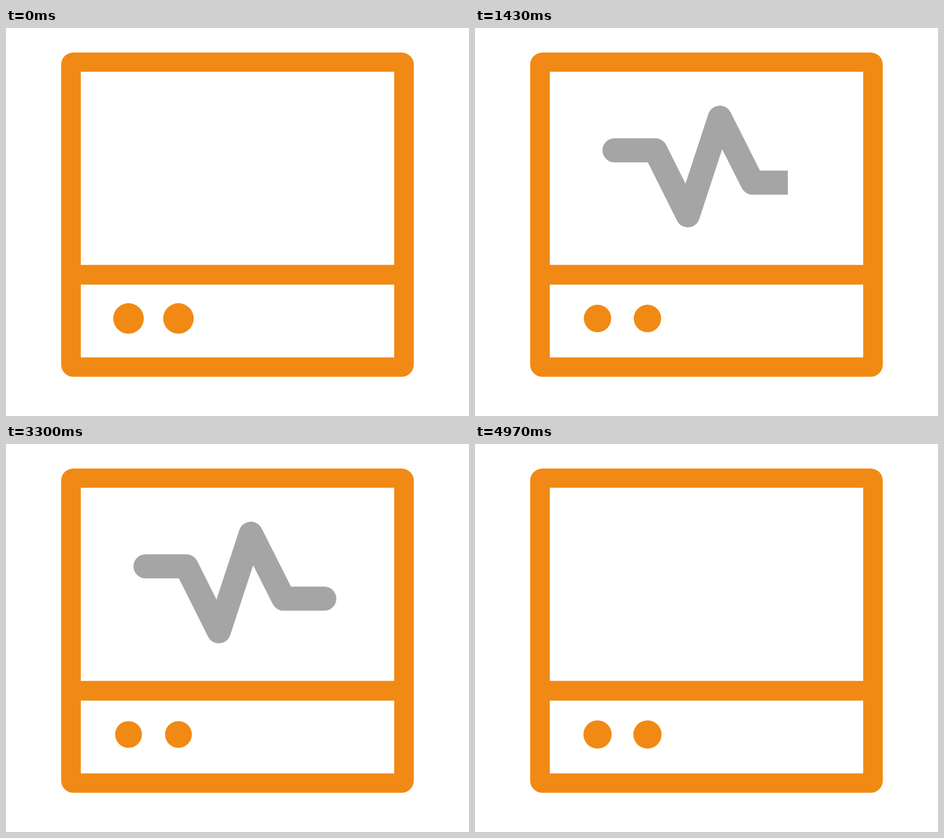
These frames come from a looping animation (817x685 px, 5010 ms). An HTML page:

```html
<!DOCTYPE html>
<html lang="en">
<head>
<meta charset="utf-8">
<title>Monitor</title>
<style>
  html, body { margin: 0; width: 100%; height: 100%; overflow: hidden; background: #fff; }
  svg { display: block; width: 817px; height: 685px; }
</style>
</head>
<body>
<svg viewBox="0 0 817 685">
  <defs>
    <clipPath id="wipe"><rect id="reveal" x="200" y="120" width="0" height="250"/></clipPath>
  </defs>
  <g fill="#f08a14">
    <rect x="97.3" y="43.3" width="622.3" height="572.5" rx="21.5"/>
    <path fill="#fff" d="M132 77.3H685V418.3H132ZM132 453H685V581.5H132Z"/>
    <circle class="dot" cx="216.2" cy="512.8"/>
    <circle class="dot" cx="304.3" cy="512.8"/>
  </g>
  <g clip-path="url(#wipe)">
    <polyline id="wave" points="246.2,216 318.3,216 375.5,330.6 432,158.4 489.7,273 561.6,273"
      fill="none" stroke="#a5a5a5" stroke-width="42.6" stroke-linecap="round" stroke-linejoin="round"/>
  </g>
</svg>
<script>
const LOOP = 5010, STEP = 100 / 3;
const WIPE = { from: 225, to: 583, time: 1870, power: 1.675, hideAt: 4000 };
const BEAT = { start: 150, fall: 600, rise: 300, small: 23.2, large: 30.7 };

const reveal = document.getElementById("reveal");
const wave = document.getElementById("wave");
const dots = document.querySelectorAll(".dot");

const mix = (a, b, u) => a + (b - a) * u;
const easeOut = (u, power) => 1 - (1 - u) ** power;
const smooth = u => u * u * (3 - 2 * u);

// Each beat starts at full size, shrinks slowly and swells quickly
function radiusAt(t) {
  const { start, fall, rise, small, large } = BEAT;
  const period = fall + rise;
  const phase = (t - start + period) % period;
  return phase < fall
    ? mix(large, small, easeOut(phase / fall, 2))
    : mix(small, large, smooth((phase - fall) / rise));
}

function edgeAt(t) {
  const u = Math.min(t / WIPE.time, 1);
  return Math.round(mix(WIPE.from, WIPE.to, easeOut(u, WIPE.power)));
}

function draw(t) {
  reveal.setAttribute("width", edgeAt(t) - 200);
  wave.style.display = t > 0 && t < WIPE.hideAt ? "" : "none";
  const r = radiusAt(t);
  dots.forEach(dot => dot.setAttribute("r", r));
}

function tick() {
  const t = (performance.now() - start) % LOOP;
  // Snap to 30 pictures a second; the offset absorbs rounded times
  draw(Math.floor((t + 3.4) / STEP) * STEP);
  requestAnimationFrame(tick);
}

const start = performance.now();
tick();
</script>
</body>
</html>
```
